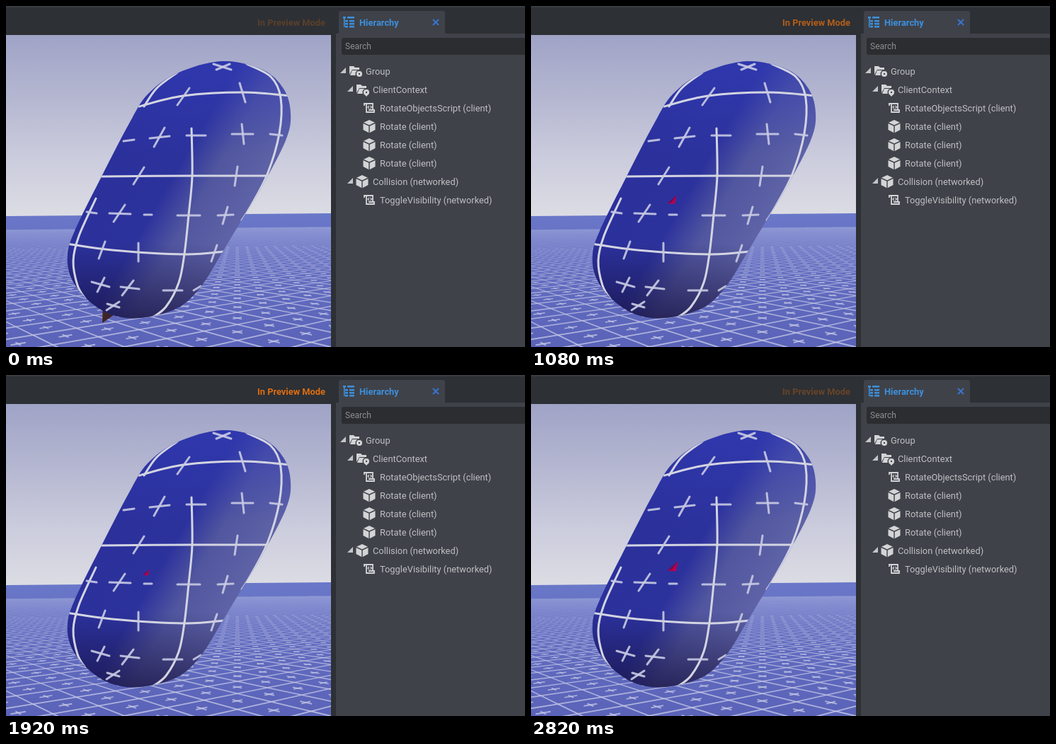
Recreate the animation shown at these times as an HTML page with a canvas. Size 733x482 px, loop 2.88 s.

```html
<!DOCTYPE html>
<html lang="en">
<head>
<meta charset="utf-8">
<title>Hierarchy preview</title>
<style>
html, body { margin: 0; width: 100%; height: 100%; overflow: hidden; background: #2d3034; }
canvas { position: absolute; left: 0; top: 0; width: 733px; height: 482px; }
#ui { position: absolute; inset: 0; font: 12.85px/16px Roboto, sans-serif; color: #bfc0c3; }
#ui span { position: absolute; white-space: pre; }
#ui b { position: absolute; white-space: pre; }
</style>
</head>
<body>
<canvas id="stage" width="733" height="482"></canvas>
<div id="ui"></div>
<script>
const W = 733, H = 482, LOOP = 2880, STEP = 60, RAD = Math.PI / 180;
const VIEW = { x: 0, y: 41, w: 459, h: 441 };
const ctx = document.getElementById('stage').getContext('2d');

const add = (p, q, k = 1) => [p[0] + q[0] * k, p[1] + q[1] * k];
const clamp = (v, a, b) => Math.max(a, Math.min(b, v));
const mix = (a, b, k) => `rgb(${a.map((v, i) => Math.round(v + (b[i] - v) * k))})`;

function layer(paint) {
  const c = document.createElement('canvas');
  c.width = W; c.height = H;
  paint(c.getContext('2d'));
  return c;
}
function ramp(g, p, q, stops) {
  const r = g.createLinearGradient(...p, ...q);
  stops.forEach(([at, color]) => r.addColorStop(at, color));
  return r;
}
function poly(g, pts, color) {
  g.beginPath();
  pts.forEach(p => g.lineTo(...p));
  g.closePath();
  if (color) { g.fillStyle = color; g.fill(); }
}
// Catmull-Rom curve through a flat list of coordinates
function curve(g, flat, closed) {
  const n = flat.length / 2;
  const at = i => {
    const k = closed ? (i + n) % n : clamp(i, 0, n - 1);
    return [flat[2 * k], flat[2 * k + 1]];
  };
  g.beginPath();
  g.moveTo(...at(0));
  for (let i = 0; i < (closed ? n : n - 1); i++) {
    const a = at(i - 1), b = at(i), c = at(i + 1), d = at(i + 2);
    g.bezierCurveTo(b[0] + (c[0] - a[0]) / 6, b[1] + (c[1] - a[1]) / 6,
      c[0] - (d[0] - b[0]) / 6, c[1] - (d[1] - b[1]) / 6, ...c);
  }
}

// ---- static layers ----
function paintFloor(g) {
  const focal = 700, yaw = Math.atan(530 / 700), cell = 0.4;
  const cs = Math.cos(yaw), sn = Math.sin(yaw);
  const depth = (a, b) => a * cs + b * sn;
  const spot = (a, b) => {
    const z = depth(a, b), x = b * cs - a * sn;
    const sx = 230 + focal * x / z;
    return [sx, 297 - sx * 4 / 459 + focal / z];
  };
  const seg = (a, b, c, d) => {
    g.beginPath();
    g.moveTo(...spot(a, b));
    g.lineTo(...spot(c, d));
    g.stroke();
  };
  for (let i = -30; i < 110; i++) for (let j = -30; j < 110; j++) {
    const a = i * cell, b = j * cell, z = depth(a, b);
    if (z < 3 || z > 36) continue;
    const x = spot(a, b)[0];
    if (x < -160 || x > 620) continue;
    const fade = clamp(5 / z, 0.1, 0.75);
    g.lineWidth = clamp(7 / z, 0.6, 2);
    g.strokeStyle = `rgba(200,203,232,${fade})`;
    seg(a, b, a + cell, b);
    seg(a, b, a, b + cell);
    if (z > 15) continue;
    const m = a + cell / 2, n = b + cell / 2, r = cell * 0.15;
    seg(m - r, n, m + r, n);
    seg(m, n - r, m, n + r);
  }
}

const scene = layer(g => {
  g.beginPath();
  g.rect(VIEW.x, VIEW.y, VIEW.w, VIEW.h);
  g.clip();
  g.fillStyle = ramp(g, [0, 41], [0, 296], [
    [0, '#9fa3c6'], [0.35, '#b5b7d1'], [0.7, '#cccddd'], [1, '#dcdce4']]);
  g.fillRect(0, 41, 459, 260);
  poly(g, [[0, 297], [459, 293], [459, 482], [0, 482]],
    ramp(g, [0, 294], [0, 482], [[0, '#6a78c9'], [0.25, '#6570c2'], [1, '#5a63b8']]));
  paintFloor(g);
});

const OUTLINE = [305, 78, 362, 90, 392, 117, 402, 152, 395, 190, 360, 258, 335, 299, 305, 349,
  275, 397, 242, 427, 190, 441, 148, 436, 114, 414, 92, 384, 87, 352, 97, 318, 135, 241,
  174, 166, 200, 125, 242, 95];
const BANDS = [
  [188, 142, 250, 127, 335, 122, 402, 127],
  [132, 241, 262, 240, 372, 240],
  [86, 336, 150, 345, 252, 351, 308, 347],
  [262, 173, 263, 240, 258, 295, 252, 350, 244, 391, 226, 425, 206, 441],
  [242, 94, 213, 116, 195, 142],
  [127, 272, 103, 325, 95, 360, 101, 395, 112, 414],
  [340, 82, 374, 100, 388, 130, 386, 180, 369, 238, 345, 284, 333, 303]];
const TICKS = [293, 82, 318, 90, 297, 90, 316, 82, 242, 140, 259, 116, 330, 109, 338, 136,
  166, 191, 181, 189, 203, 187, 231, 184, 209, 199, 224, 172, 255, 183, 282, 183,
  319, 181, 349, 181, 333, 167, 336, 195, 373, 181, 390, 183, 180, 252, 195, 228,
  327, 227, 323, 254, 114, 291, 128, 293, 146, 293, 176, 294, 152, 305, 168, 281,
  195, 295, 206, 295, 242, 296, 274, 296, 299, 296, 321, 295, 313, 284, 306, 308,
  131, 357, 140, 333, 187, 335, 187, 361, 298, 338, 290, 361, 121, 390, 146, 397,
  129, 404, 139, 384, 162, 397, 188, 400, 164, 409, 180, 388, 222, 402, 249, 402,
  143, 421, 160, 426, 142, 430, 160, 418, 265, 402, 275, 396];

const collider = layer(g => {
  curve(g, OUTLINE, true);
  g.clip();
  g.fillStyle = ramp(g, [150, 205], [340, 315], [
    [0, '#2b309b'], [0.42, '#2c329c'], [0.64, '#51569f'], [1, '#6165a8']]);
  g.fillRect(0, 0, W, H);
  g.fillStyle = ramp(g, [0, 78], [0, 210], [[0, 'rgba(50,60,185,.6)'], [1, 'rgba(50,60,185,0)']]);
  g.fillRect(0, 0, W, 210);
  g.fillStyle = ramp(g, [0, 335], [0, 441], [[0, 'rgba(22,16,62,0)'], [1, 'rgba(22,16,62,.7)']]);
  g.fillRect(0, 335, W, 147);
  g.lineCap = 'round';
  g.strokeStyle = '#d3d4e2';
  g.lineWidth = 3;
  BANDS.forEach(b => { curve(g, b); g.stroke(); });
  g.strokeStyle = 'rgba(200,202,228,.9)';
  for (let i = 0; i < TICKS.length; i += 4) { curve(g, TICKS.slice(i, i + 4)); g.stroke(); }
});

// ---- panel ----
const ICON = '#d3d4d6', PANEL = '#3f4249';
const ROWS = [['Group', 508, 'folder', 1], ['ClientContext', 518, 'folder', 1],
  ['RotateObjectsScript (client)', 528, 'script'], ['Rotate (client)', 528, 'cube'],
  ['Rotate (client)', 528, 'cube'], ['Rotate (client)', 528, 'cube'],
  ['Collision (networked)', 518, 'cube', 1], ['ToggleVisibility (networked)', 528, 'script']];

const icons = {
  folder(g, x, y, pin) {
    poly(g, [[x - 8, y - 7], [x - 2, y - 7], [x, y - 5], [x + 6, y - 5], [x + 6, y - 2],
      [x - 4, y - 2], [x - 8, y + 5]], ICON);
    poly(g, [[x - 4, y - 1], [x + 9, y - 1], [x + 7, y + 6], [x - 7, y + 6]], ICON);
    g.beginPath();
    g.arc(x + 6, y + 4, 4.8, 0, 7);
    g.fillStyle = ICON;
    g.strokeStyle = PANEL;
    g.lineWidth = 1.5;
    g.fill(); g.stroke();
    if (pin) poly(g, [[x + 2.5, y + 6], [x + 9.5, y + 6], [x + 6, y + 10]], ICON);
    g.fillStyle = PANEL;
    g.fillRect(x + 5, y + 3, 2, 2);
  },
  script(g, x, y) {
    g.strokeStyle = ICON;
    g.lineWidth = 1.8;
    g.beginPath();
    g.moveTo(x - 7, y - 3); g.lineTo(x - 7, y - 6); g.lineTo(x + 5, y - 6);
    g.lineTo(x + 5, y + 4); g.moveTo(x - 4, y - 6); g.lineTo(x - 4, y + 6);
    g.lineTo(x + 7, y + 6); g.lineTo(x + 7, y + 3); g.lineTo(x - 1, y + 3);
    g.stroke();
    g.lineWidth = 1.2;
    g.beginPath();
    g.moveTo(x, y - 3); g.lineTo(x - 2, y - 1); g.lineTo(x, y + 1);
    g.moveTo(x + 1.5, y - 3); g.lineTo(x + 3.5, y - 1); g.lineTo(x + 1.5, y + 1);
    g.stroke();
  },
  cube(g, x, y) {
    poly(g, [[x, y - 9], [x + 8.5, y - 5], [x + 8.5, y + 5], [x, y + 9.5], [x - 8.5, y + 5], [x - 8.5, y - 5]], ICON);
    g.strokeStyle = PANEL;
    g.lineWidth = 1.4;
    g.beginPath();
    g.moveTo(x - 9, y - 5); g.lineTo(x, y - 0.8); g.lineTo(x + 9, y - 5);
    g.moveTo(x, y - 0.8); g.lineTo(x, y + 10);
    g.stroke();
  }
};

const panel = layer(g => {
  const box = (x, y, w, h, c) => { g.fillStyle = c; g.fillRect(x, y, w, h); };
  box(0, 0, W, 41, '#2d3034');
  box(0, 0, W, 2, '#3a3d42');
  box(459, 2, 274, 480, '#2d3034');
  box(466, 39, 267, 443, PANEL);
  g.fillStyle = PANEL;
  g.beginPath(); g.roundRect(470, 7, 150, 34, [3, 3, 0, 0]); g.fill();
  g.fillStyle = '#2b2d30';
  g.beginPath(); g.roundRect(474, 45, 264, 24, 3); g.fill();
  [[476, 15, 4], [482, 15, 10], [479, 20, 4], [485, 20, 7], [479, 24, 4], [485, 24, 7],
    [479, 28, 4], [485, 28, 7]].forEach(([x, y, w]) => box(x, y, w, 2.5, '#3d90dc'));
  box(477, 16, 1.5, 14, '#3d90dc');
  g.strokeStyle = '#3975cf';
  g.lineWidth = 2;
  g.beginPath();
  g.moveTo(603, 19); g.lineTo(611, 27); g.moveTo(611, 19); g.lineTo(603, 27);
  g.stroke();
  ROWS.forEach(([, x, kind, open], i) => {
    const y = 92 + 26 * i;
    icons[kind](g, x - 15, y, i === 1);
    if (open) poly(g, [[x - 28, y - 5], [x - 28, y + 3], [x - 36, y + 3]], '#c4c5c7');
  });
});

const ui = document.getElementById('ui');
function label(text, x, y, color, tag = 'span', size) {
  const e = document.createElement(tag);
  e.textContent = text;
  e.style.cssText = `left:${x}px;top:${y - 8}px;color:${color}`;
  if (size) e.style.fontSize = size + 'px';
  ui.append(e);
  return e;
}
ROWS.forEach(([text, x], i) => label(text, x, 92.5 + 26 * i, '#bfc0c3'));
label('Hierarchy', 499, 23.5, '#3d90dc', 'b');
label('Search', 479, 57, '#8d8f93', 'span', 12);
const mode = label('In Preview Mode', 355, 23.5, '#dc6d14', 'b');

// ---- rotating solids ----
const U = [96, 3], V = [-22, 107];
const dir = deg => add([U[0] * Math.cos(deg * RAD), U[1] * Math.cos(deg * RAD)], V, Math.sin(deg * RAD));
const turn = t => { const u = t - 1560; return 90 + u * 0.10299 + u * u * 2.42e-6; };

function drawCone(g, deg) {
  const phi = deg + 182, c = Math.cos(phi * RAD), s = Math.sin(phi * RAD);
  const mid = [185, 361], w = dir(phi + 90), back = [-68, -12], R = 0.44;
  const tip = add(mid, dir(phi), 0.89 * (1 - 0.09 * c));
  tip[0] += 11 * Math.max(0, s);
  const rim = [];
  for (let i = 0; i < 60; i++) {
    const a = i * 6 * RAD;
    rim.push(add(add(mid, w, R * Math.cos(a)), back, R * Math.sin(a)));
  }
  const axis = Math.atan2(mid[1] - tip[1], mid[0] - tip[0]);
  const off = p => {
    const d = Math.atan2(p[1] - tip[1], p[0] - tip[0]) - axis;
    return Math.atan2(Math.sin(d), Math.cos(d));
  };
  const sides = [...rim].sort((p, q) => off(p) - off(q));
  const k = (1 + c) / 2;
  const skin = ramp(g, add(mid, w, R), add(mid, w, -R), [
    [0, mix([70, 45, 130], [125, 65, 160], k)],
    [0.3, mix([120, 66, 30], [110, 48, 140], k)],
    [0.55, mix([165, 94, 22], [80, 30, 110], k ** 3)],
    [1, mix([62, 28, 18], [45, 20, 75], k)]]);
  const body = [tip, sides[0], mid, sides[59]];
  const shade = `rgba(24,18,52,${0.8 * Math.max(0, s)})`;
  [skin, shade].forEach(f => {
    g.beginPath();
    [body, rim].forEach(pts => {
      const area = pts.reduce((n, p, i) => {
        const q = pts[(i + 1) % pts.length];
        return n + p[0] * q[1] - p[1] * q[0];
      }, 0);
      const path = area > 0 ? pts : [...pts].reverse();
      path.forEach((p, i) => i ? g.lineTo(...p) : g.moveTo(...p));
      g.closePath();
    });
    g.fillStyle = f;
    g.fill();
  });
  if (c > 0.15) poly(g, rim, '#4c2a50');
}

function capsuleEnds(deg) {
  return [0, 180].map(turned => {
    const a = deg - 7 + turned, c = Math.cos(a * RAD), s = Math.sin(a * RAD);
    return { p: add([259, 222.5], dir(a), 0.5), r: 53 - 7 * c - 5 * s, c, s };
  });
}
function drawCapsule(g, ends) {
  const [a, b] = ends;
  const left = a.c < b.c ? a : b, right = left === a ? b : a, top = a.s < b.s ? a : b;
  const dx = b.p[0] - a.p[0], dy = b.p[1] - a.p[1];
  const ang = Math.atan2(dy, dx), beta = Math.acos((a.r - b.r) / Math.hypot(dx, dy));
  const flat = left.c ** 2;
  const hull = () => {
    g.beginPath();
    g.arc(...a.p, a.r, ang + beta, ang - beta + 2 * Math.PI);
    g.arc(...b.p, b.r, ang - beta, ang + beta);
    g.closePath();
  };
  const glow = (p, r, rgb, alpha) => {
    const f = g.createRadialGradient(...p, 0, ...p, r);
    f.addColorStop(0, `rgba(${rgb},${alpha})`);
    f.addColorStop(0.45, `rgba(${rgb},${alpha * 0.75})`);
    f.addColorStop(1, `rgba(${rgb},0)`);
    g.fillStyle = f;
    g.fillRect(p[0] - r, p[1] - r, 2 * r, 2 * r);
  };
  g.save();
  hull();
  g.fillStyle = '#1fae3c';
  g.fill();
  g.clip();
  g.filter = 'blur(6px)';
  hull();
  g.strokeStyle = '#2f82a8';
  g.lineWidth = 24;
  g.stroke();
  g.filter = 'none';
  glow(add(left.p, [-22, 24]), 46, '14,84,16', 0.9 * flat);
  glow(add(left.p, [-8, -22]), 30, '40,200,50', 0.7 * flat);
  glow(add(top.p, [0, 22]), 34, '10,120,20', 0.85 * (1 - flat));
  glow(add(top.p, [28, 5]), 32, '40,215,75', 0.7 * (1 - flat));
  glow(add(top.p, [37, -22]), 30, '190,255,205', 1 - flat);
  g.globalAlpha = flat;
  g.filter = 'blur(4px)';
  g.lineCap = 'butt';
  g.lineWidth = 44;
  g.strokeStyle = '#4fe08c';
  g.beginPath();
  g.moveTo(...add(left.p, [25, -29])); g.lineTo(...add(right.p, [33, -16]));
  g.stroke();
  g.lineWidth = 25;
  g.strokeStyle = '#d4ffe4';
  g.beginPath();
  g.moveTo(...add(left.p, [27, -32])); g.lineTo(...add(right.p, [30, -20]));
  g.stroke();
  g.restore();
  return left;
}

function cubeFront(deg) {
  const x = dir(deg), y = dir(deg + 90);
  return [[-1, -1], [1, -1], [1, 1], [-1, 1]].map(([i, j]) => add(add([265.5, 272], x, i / 2), y, j / 2));
}
function drawSolids(g, deg) {
  const face = ((deg % 90) + 90) % 90;
  const front = cubeFront(face > 60 ? face - 90 : face), ends = capsuleEnds(deg);
  drawCone(g, deg);
  const left = drawCapsule(g, ends);
  const rear = p => add(p, [-69, 5 - 14 * (p[1] - 216) / 109]);
  front.forEach((p, i) => {
    const q = front[(i + 1) % 4], n = [q[1] - p[1], p[0] - q[0]], d = add(rear(p), p, -1);
    if (n[0] * d[0] + n[1] * d[1] <= 0) return;
    const len = Math.hypot(...n), down = n[1] / len;
    poly(g, [p, q, rear(q), rear(p)], down > 0
      ? mix([86, 0, 88], [38, 0, 46], clamp(down * 1.2, 0, 1))
      : mix([86, 0, 88], [130, 10, 95], clamp(-down - 0.45, 0, 1)));
  });
  // the near end of the capsule breaks through the left face
  g.save();
  g.beginPath();
  g.arc(...add(left.p, [-42, -9]), 34 * Math.max(0, -left.c), 0, 7);
  g.clip();
  drawCapsule(g, ends);
  g.restore();
  poly(g, front, ramp(g, front[0], front[2], [[0, '#bd0058'], [0.5, '#c90054'], [1, '#cf0a4e']]));
  // cone peak in front of the cube when it points up
  const rise = Math.max(0, -Math.sin((deg + 182) * RAD)) ** 6;
  if (rise > 0.1) {
    g.save();
    g.beginPath();
    g.ellipse(173, 326, 23, 23 * rise, 0, 0, 7);
    g.clip();
    drawCone(g, deg);
    g.restore();
  }
}

function drawCollider(g, deg) {
  drawCone(g, deg);
  g.drawImage(collider, 0, 0);
  const tilt = ((deg % 90) + 90) % 90;
  const size = 1 - Math.abs(tilt - 44.5) / 17;
  if (size <= 0) return;
  const corner = cubeFront(tilt).sort((p, q) => p[0] - q[0])[0];
  const at = (x, y) => add(corner, [x, y], size);
  poly(g, [at(-5, 5), at(11, -9), at(8, 6)], '#b8004c');
  poly(g, [at(-5, 5), at(11, -9), at(2, 3)], '#6a0a58');
}

function frame(now) {
  const t = Math.floor((now % LOOP) / STEP) * STEP, deg = turn(t);
  ctx.drawImage(scene, 0, 0);
  ctx.save();
  ctx.beginPath();
  ctx.rect(VIEW.x, VIEW.y, VIEW.w, VIEW.h);
  ctx.clip();
  if ((t + 120) % 960 < 480) drawCollider(ctx, deg);
  else drawSolids(ctx, deg);
  ctx.restore();
  ctx.drawImage(panel, 0, 0);
  mode.style.opacity = clamp(0.68 - 0.85 * Math.cos((t - 200) / 1200 * 2 * Math.PI), 0.22, 1);
}

const start = performance.now();
function tick() {
  frame(performance.now() - start);
  requestAnimationFrame(tick);
}
tick();
</script>
</body>
</html>
```
